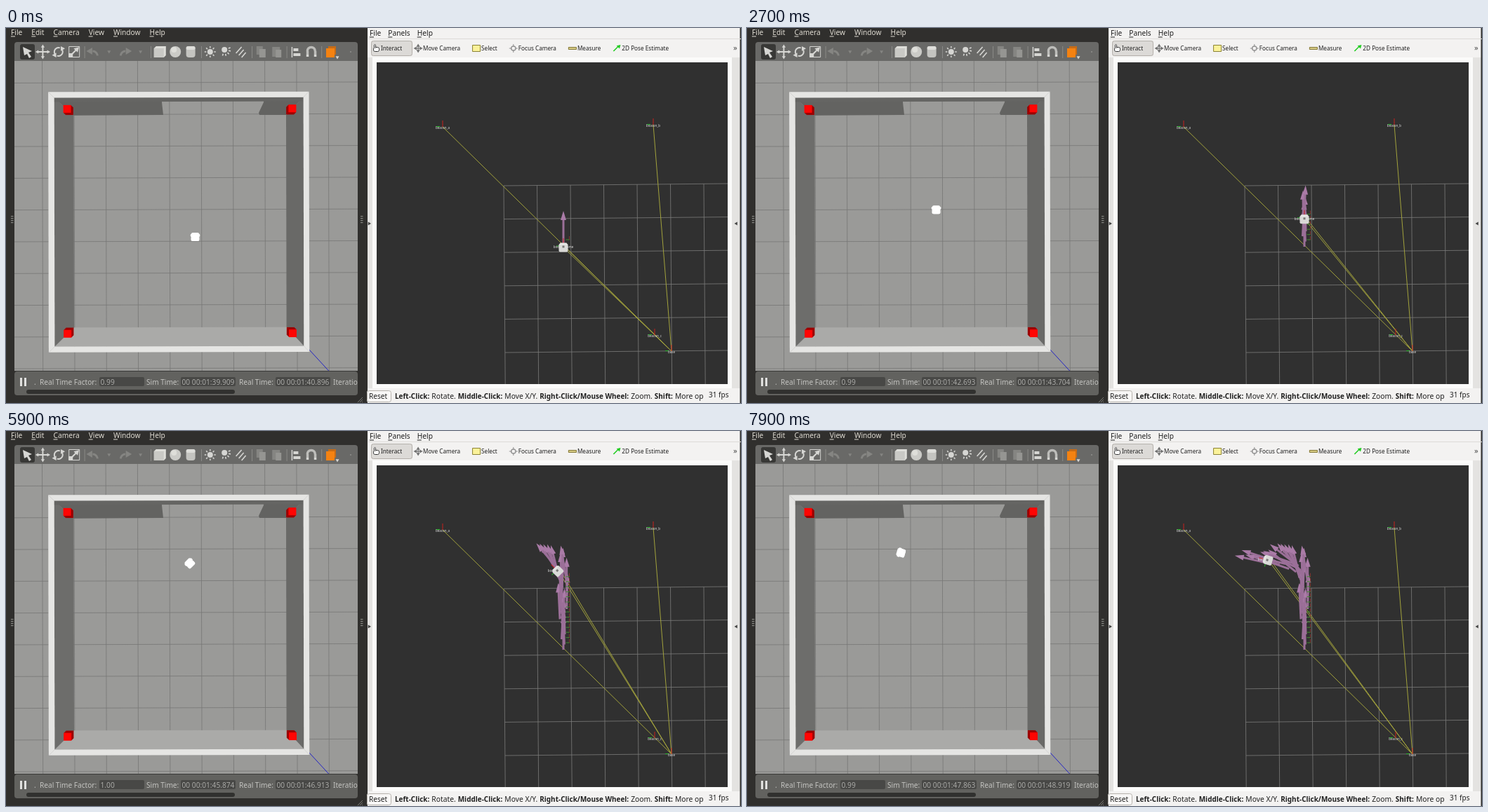
These frames come from a looping animation (1047 px wide and 535 px high, 8000 ms). An HTML page with a canvas:

```html
<!DOCTYPE html>
<html lang="en">
<head>
<meta charset="utf-8">
<title>Robot simulation and tracking view</title>
<style>
html, body { margin: 0; width: 100%; height: 100%; overflow: hidden; background: #302f2d; }
canvas { display: block; }
</style>
</head>
<body>
<canvas id="stage" width="1047" height="535"></canvas>
<script>
const ctx = document.getElementById('stage').getContext('2d');
const LOOP = 8000, STEP = 100;
const INK = '#1f1f1f', LIGHT = '#d6d6d3', DIM = '#858582', YELLOW = '#a2a23c';
const RED = '#c8201c', GREEN = '#27b52a';
const ORIGIN = [948, 461];

const clamp = v => Math.max(0, Math.min(1, v));
const rad = deg => deg * Math.PI / 180;

// ---- drawing helpers ----

function rect(x, y, w, h, fill, radius = 0) {
  ctx.fillStyle = fill;
  ctx.beginPath();
  ctx.roundRect(x, y, w, h, radius);
  ctx.fill();
}
function box(x, y, w, h, fill, border, radius = 0) {
  rect(x, y, w, h, fill, radius);
  ctx.strokeStyle = border;
  ctx.lineWidth = 1;
  ctx.beginPath();
  ctx.roundRect(x + .5, y + .5, w - 1, h - 1, radius);
  ctx.stroke();
}
function trace(points) {
  ctx.beginPath();
  for (const [x, y] of points) ctx.lineTo(x, y);
}
function poly(fill, ...points) {
  ctx.fillStyle = fill;
  trace(points);
  ctx.fill();
}
function line(color, width, ...points) {
  ctx.strokeStyle = color;
  ctx.lineWidth = width;
  trace(points);
  ctx.stroke();
}
function arc(color, width, x, y, r, from = 0, to = 360) {
  ctx.strokeStyle = color;
  ctx.lineWidth = width;
  ctx.beginPath();
  ctx.arc(x, y, r, rad(from), rad(to));
  ctx.stroke();
}
function disc(x, y, r, fill) {
  ctx.fillStyle = fill;
  ctx.beginPath();
  ctx.arc(x, y, r, 0, 7);
  ctx.fill();
}
function triangle(x, y, r, angle, fill) {
  at(x, y, rad(angle), () => poly(fill, [0, -r], [r, r * .7], [-r, r * .7]));
}
function at(x, y, angle, draw) {
  ctx.save();
  ctx.translate(x, y);
  ctx.rotate(angle);
  draw();
  ctx.restore();
}
function spin(count, draw) {
  for (let k = 0; k < count; k++) at(0, 0, k * 2 * Math.PI / count, draw);
}
function clip(x, y, w, h, draw) {
  ctx.save();
  ctx.beginPath();
  ctx.rect(x, y, w, h);
  ctx.clip();
  draw();
  ctx.restore();
}
function text(str, x, y, size, color, weight = 400) {
  ctx.font = `${weight} ${size}px "Noto Sans", "Open Sans", sans-serif`;
  ctx.fillStyle = color;
  ctx.fillText(str, x, y);
  return ctx.measureText(str).width;
}
function menu(words, x, y, gap, color) {
  for (const word of words) {
    const width = text(word, x, y, 10.2, color);
    rect(x, y + 1.5, 6, 1, color);
    x += width + gap;
  }
}
function fourWay(r, color, width) {
  spin(4, () => {
    line(color, width, [0, 0], [0, 2 - r]);
    triangle(0, 1 - r, 2.6, 0, color);
  });
}

// ---- motion: straight up, a left turn, then straight again ----

const DT = .02, SPEED = 22.7;
const track = [], trail = [];
{
  const robot = { x: 0, y: 0, deg: 0 };
  let progress = 1;
  for (let t = 0; t <= LOOP / 1000; t += DT) {
    const move = SPEED * clamp((t - .65) / .7) * DT;
    const deg = 45 * clamp((t - 5) / .9) + 29 * clamp((t - 5.9) / .5);
    robot.x -= move * Math.sin(rad(deg));
    robot.y -= move * Math.cos(rad(deg));
    progress += move / 7 + (deg - robot.deg) / 12;
    robot.deg = deg;
    track.push({ ...robot });
    if (progress >= 1) {
      progress -= 1;
      trail.push({ ...robot, t });
    }
  }
}
const robotAt = t => track[Math.round(t / DT)];
const tracked = p => [794 + p.x * 1.035, 312 + p.y * 1.035];

// ---- simulator window ----

function undo(flip) {
  ctx.scale(flip, 1);
  triangle(-5, -1, 5, -90, DIM);
  arc(DIM, 3, -1, 6, 7, -90, -5);
}
const caret = () => triangle(0, 0, 2.5, 180, DIM);

const toolGroups = [
  [() => {
    rect(-10, -11, 21, 22, '#383836', 3);
    poly(LIGHT, [-6, -7], [7, -1], [2, 1], [6, 7], [3, 9], [0, 3], [-4, 5]);
  }, () => fourWay(9, LIGHT, 2), () => spin(2, () => {
    arc(LIGHT, 2, 0, 0, 6, -30, 110);
    triangle(5, -5, 3.5, -30, LIGHT);
  }), () => {
    box(-8, -8, 16, 16, '#696967', LIGHT);
    line(LIGHT, 2, [-5, 5], [5, -5]);
    rect(-8, 2, 6, 6, LIGHT);
    triangle(4, -4, 4, 45, LIGHT);
  }],
  [() => undo(1), caret, () => undo(-1), caret],
  [() => {
    poly('#deded9', [-8, -5], [-5, -8], [9, -8], [9, 5], [6, 8], [-8, 8]);
    rect(-8, -5, 14, 13, '#c9c9c5');
  }, () => {
    disc(0, 0, 8, '#cbcbc7');
    disc(-2, -3, 4, '#deded9');
  }, () => {
    rect(-7, -8, 13, 16, '#c4c4c0', 4);
    rect(-7, -8, 13, 5, '#dededa', 3);
  }],
  [() => {
    disc(0, 0, 4, LIGHT);
    spin(8, () => line(LIGHT, 1.5, [0, -5.5], [0, -8]));
  }, () => {
    disc(-2, -3, 4, LIGHT);
    for (let k = 0; k < 5; k++) at(-2, -3, rad(70 + k * 32), () => line(LIGHT, 1.6, [0, -6], [0, -9]));
  }, () => {
    for (let k = 0; k < 3; k++) line(LIGHT, 1.6, [k * 4 - 8, 2 + k * 3], [k * 3, k * 4 - 7]);
  }],
  [() => {
    rect(-6, -8, 9, 12, DIM);
    rect(-2, -4, 9, 12, '#959592');
  }, () => {
    rect(-6, -7, 11, 14, DIM);
    rect(-1, -3, 8, 11, '#959592');
  }],
  [() => {
    line(LIGHT, 1.5, [-5, -7], [-5, 8]);
    rect(-3, -5, 7, 4, LIGHT);
    rect(-3, 2, 10, 4, LIGHT);
  }, () => {
    arc('#bdbdba', 3.5, 0, -1, 5.5, 180, 360);
    for (const x of [-7, 4]) {
      rect(x, -1, 3.5, 5, '#bdbdba');
      rect(x, 4, 3.5, 3, LIGHT);
    }
  }],
  [() => {
    rect(-3, -8, 11, 12, '#c66b16');
    rect(-6, -5, 12, 13, '#f58211');
    triangle(10, 8, 2.5, 180, LIGHT);
  }]
];

function simToolbar() {
  rect(12, 20, 489, 40, '#696967', 4);
  let x = 30;
  for (const group of toolGroups) {
    for (const icon of group) {
      at(x, 34, 0, icon);
      x += 22.4;
    }
    if (x < 470) line('#8a8a87', 1, [x - 7.5, 26], [x - 7.5, 43]);
    x += 4.8;
  }
  rect(490, 33, 2, 2, DIM);
}

// Corners of a slightly turned square, clockwise from the top left
function square(cx, cy, half) {
  return [[-1, -1], [1, -1], [1, 1], [-1, 1]].map(([i, j]) =>
    [cx + half * (i + j * .002), cy + half * (j - i * .002)]);
}

function simRoom() {
  rect(12, 47, 489, 443, '#9a9a98');
  clip(12, 47, 489, 443, () => {
    for (let i = 0; i < 11; i++) {
      const x = 51.5 + 45.3 * i, y = 78.5 + 45.3 * i;
      line('#777775', .8, [x, 47], [x + 1.2, 490]);
      line('#777775', .8, [12, y], [501, y - 1.5]);
    }
    line('#2222c4', 1, [432, 459], [460.5, 490]);
  });
  const outer = square(246.2, 276.7, 185.7), inner = square(246.5, 276.7, 177.5);
  const floor = square(248, 275.7, 151.3);
  const wall = (k, color) => poly(color, inner[k], inner[(k + 1) % 4], floor[(k + 1) % 4], floor[k]);
  wall(1, '#696967');
  wall(2, '#aaaaa8');
  wall(3, '#6d6d6b');
  const [tl, tr] = inner;
  poly('#636361', tl, [222, 100], [222, 106], [224, 124], floor[0]);
  poly('#636361', tr, [368, 99], [367, 106], [360, 121], [361, 124], floor[1]);
  poly('#656563', tl, tr, [tr[0], 104.5], [tl[0], 105.5]);
  for (let k = 0; k < 4; k++) {
    const n = (k + 1) % 4;
    poly('#e5e5e3', outer[k], outer[n], inner[n], inner[k]);
  }
  for (const [x, y] of square(247.8, 275.5, 160.4)) {
    for (let k = 6; k >= 0; k--) {
      const lean = k * .01;
      rect(x + (248 - x) * lean * .33 - 5.5, y + (275 - y) * lean * .33 - 5.5, 11, 11, k ? '#9c0000' : '#ff0503');
    }
  }
}

function simRobot({ x, y, deg }) {
  at(269.5 + x, 298 + y, -rad(deg), () => {
    rect(-5.5, -6, 11, 12, '#fff', 2);
    rect(-6.7, -4.5, 13.4, 4.5, '#fff', 1.5);
    rect(-6, -1, 12, 7, '#fff', 2);
  });
}

function simStatus(updates) {
  rect(12, 490, 489, 34, '#62625f', 4);
  rect(12, 489, 489, 1, '#3a3a38');
  for (const x of [20, 26]) rect(x, 499, 3, 12, '#e0e0de');
  const label = (str, x) => text(str, x, 509, 10.1, '#c4c4c1');
  const field = (str, x, w) => {
    rect(x, 498, w, 13, '#484846', 2);
    text(str, x + 1.5, 509, 10.2, '#a9a9a6');
  };
  const clock = s => '00 00:01:' + s.toFixed(3);
  const wave = Math.cos((updates - 30) * Math.PI / 23) ** 3;
  clip(12, 490, 489, 34, () => {
    label('.', 40);
    label('Real Time Factor:', 48);
    field((.99 + .01 * wave).toFixed(2), 133, 64);
    label('Sim Time:', 200);
    field(clock(39.909 + updates * .19885), 249, 78);
    label('Real Time:', 332);
    field(clock(40.896 + updates * .20057), 384, 78);
    label('Iterations:', 466);
  });
  rect(29, 516, 297, 6, '#31312f', 3);
}

function simWindow(t, updates) {
  rect(0, 0, 516, 535, '#302f2d');
  menu(['File', 'Edit', 'Camera', 'View', 'Window', 'Help'], 7, 10, 13, '#dfdbd2');
  simToolbar();
  simRoom();
  simRobot(robotAt(t));
  simStatus(updates);
  for (const x of [7, 505]) for (let y = 268; y < 280; y += 3) rect(x, y, 3.5, 1.2, '#858581');
  for (let k = 0; k < 3; k++) line('#7c7c78', 1, [501 + k * 3, 534], [508, 527 + k * 3]);
}

// ---- tracking window ----

const viewTools = [
  ['Interact', () => {
    box(-4, -2, 9, 7, '#fff', '#333', 2);
    box(-3, -6, 3, 6, '#fff', '#333', 1);
  }],
  ['Move Camera', () => fourWay(5, '#707070', 1.2)],
  ['Select', () => box(-6, -5, 12, 10, '#fbf29a', '#8a8236')],
  ['Focus Camera', () => {
    arc('#8d8d8d', 1.2, 0, 0, 3.2);
    spin(4, () => line('#8d8d8d', 1, [0, -2], [0, -6]));
  }],
  ['Measure', () => box(-6, -2, 12, 4, '#d5c982', '#857a3c')],
  ['2D Pose Estimate', () => {
    line('#22cc22', 1.6, [-5, 4], [2, -3]);
    triangle(3, -3, 3, 45, '#22cc22');
  }]
];

function viewToolbar() {
  menu(['File', 'Panels', 'Help'], 518, 11, 10, INK);
  rect(516, 15, 531, 1, '#dddbd8');
  box(520, 18, 59, 22, '#dcdad7', '#b3afaa', 3);
  let x = 534;
  for (const [name, icon] of viewTools) {
    at(x - 7, 29, 0, icon);
    x += text(name, x, 32, 8.2, INK) + 30;
  }
  text('»', 1036, 32, 11, '#444');
}

function viewStatus() {
  box(514, 517, 35, 17, '#f8f7f6', '#b6b2ac', 3);
  text('Reset', 517, 529, 10.1, INK);
  const hints = ['Left-Click:', 'Rotate.', 'Middle-Click:', 'Move X/Y.',
    'Right-Click/Mouse Wheel:', 'Zoom.', 'Shift:', 'More op'];
  let x = 554;
  hints.forEach((hint, i) => {
    x += text(hint, x, 529, i % 2 ? 10.3 : 9.95, INK, i % 2 ? 400 : 700) + 3;
  });
  text('31 fps', 1001, 527, 10, INK);
}

function caption(str, x, y) {
  ctx.textAlign = 'center';
  text(str, x, y, 4.5, '#dcdcdc');
  ctx.textAlign = 'left';
}
function marker(name, x, y) {
  line(RED, 1, [x, y - 9], [x, y]);
  line(GREEN, 1, [x - 9, y - .5], [x - 4, y - .5]);
  caption(name, x, y + 3);
}

function trailArrow(p, k) {
  const [x, y] = tracked(p);
  const drift = 5 * clamp(k / 3) * Math.sin(k * k);
  at(x, y, -rad(p.deg + 3 * Math.sin(2.3 * k)), () => {
    rect(drift - 1.5, -39, 3, 39, '#9b6f98');
    poly('#aa7ba7', [drift, -51], [drift + 4, -38], [drift - 4, -38]);
  });
}
function trailAxes(p) {
  if (p.deg > 5) return;
  const [x, y] = tracked(p);
  line('#3f8d2e', 1, [x + 3.5, y - 10], [x + 9, y - 10]);
  line('#963834', .8, [x + 8.5, y - 15], [x + 8.5, y - 10]);
}

function viewScene(t) {
  rect(528, 49, 500, 459, '#303030');
  clip(528, 49, 500, 459, () => {
    for (let i = 0; i < 7; i++) {
      const x = 709 + 47.5 * i, y = 225 + 47.6 * i;
      line('#7b7b7a', .8, [x, 225 - .45 * i], [x + 2.2, 508]);
      if (i < 6) line('#7b7b7a', .8, [709 + .4 * i, y], [1028, y - 3]);
    }
    const robot = robotAt(t), [x, y] = tracked(robot);
    for (const from of [[622, 141], [922, 138], [x + 2, y + 3], [x + 6, y + 4]]) line(YELLOW, 1, from, ORIGIN);

    const shown = trail.filter(p => p.t <= t);
    shown.forEach(trailArrow);
    shown.forEach(trailAxes);

    marker('beacon_a', 622, 141);
    marker('beacon_b', 922, 138);
    marker('beacon_c', 924, 438);
    marker('base', ...ORIGIN);

    at(x, y + 1, -rad(robot.deg), () => {
      line(GREEN, 1, [-10, -2], [-5, -2]);
      line(RED, 1, [0, -13], [0, -5]);
      rect(-6.5, -5.5, 13, 12, '#d9d9d7', 2);
      rect(-5, -6.5, 10, 3, '#e7e7e5', 1);
      rect(-1.5, -2.5, 3, 3, '#777775');
    });
    caption('body', x - 9, y + 2);
    if (robot.deg < 5) caption('frame', x + 8, y + 2);
  });
}

function viewWindow(t) {
  rect(515, 0, 532, 535, '#f3f2f1');
  rect(515, 42, 532, 472, '#e4e3e1');
  rect(522, 42, 512, 472, '#fbfbfa');
  rect(1045.5, 0, 1.5, 535, '#2b2b29');
  triangle(517.5, 279, 2.5, 90, '#444');
  triangle(1040, 279, 2.5, -90, '#444');
  viewToolbar();
  viewStatus();
  viewScene(t);
}

let start;
function tick(now) {
  start ??= now;
  const ms = Math.floor((now - start) % LOOP / STEP) * STEP;
  simWindow(ms / 1000, Math.floor((ms + 100) / 200));
  viewWindow(ms / 1000);
  requestAnimationFrame(tick);
}
requestAnimationFrame(tick);
</script>
</body>
</html>
```
